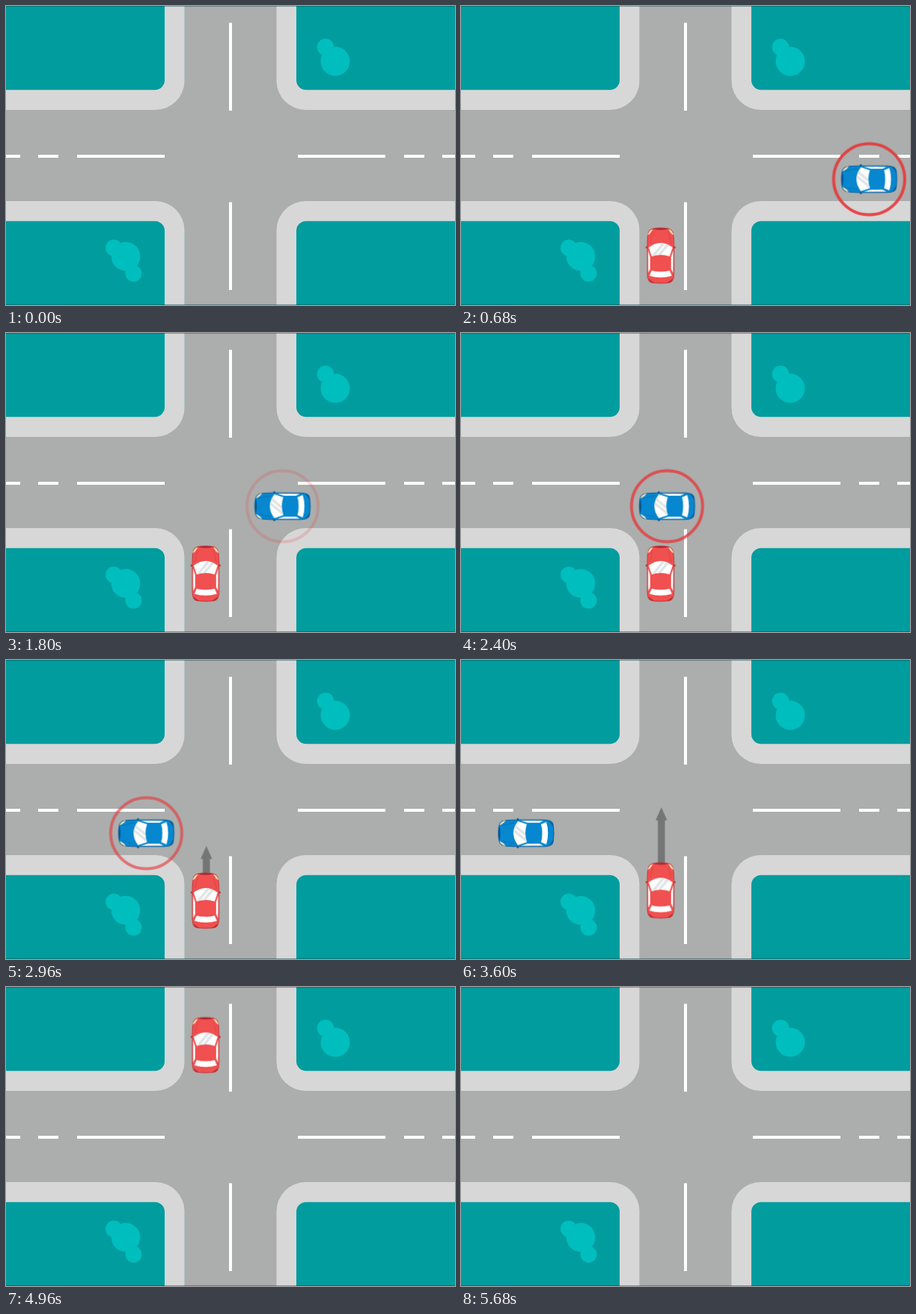
An HTML page without scripts for the animation above (5760 ms loop, 600 px wide and 400 px high).

```html
<!DOCTYPE html>
<html lang="en">
<head>
<meta charset="utf-8">
<title>Crossroads: give way</title>
<style>
  html, body { margin: 0; width: 100%; height: 100%; overflow: hidden; background: #acaead; }
  svg { display: block; width: 600px; height: 400px; }

  .blue, .red, .tip, .arrow, .ring { animation: 5760ms linear infinite; }
  .blue { animation-name: cross; --body: #0687cf; --edge: #075a9c; --tail: #0a4f8c; }
  .red { animation-name: wait; --body: #f0504f; --edge: #c2343c; --tail: #a32630; }
  .ring { animation-name: pulse; }
  .tip { animation-name: grow; }
  .arrow { animation-name: show; animation-timing-function: step-end; }

  @keyframes cross {
    from { transform: translate(652.3px, 231.7px); }
    to { transform: translate(-252px, 231.7px); }
  }
  /* roll in, stop at the line, then drive on */
  @keyframes wait {
    0% { transform: translate(266.7px, 445px); animation-timing-function: cubic-bezier(.39, .575, .565, 1); }
    17.361%, 61.111% { transform: translate(266.7px, 322px); }
    100% { transform: translate(266.7px, -57.7px); }
  }
  @keyframes pulse {
    0% { opacity: .4; }
    10.417%, 45.139%, 79.861% { opacity: 1; }
    27.778%, 62.5% { opacity: 0; }
    100% { opacity: 0; }
  }
  @keyframes grow {
    0%, 43.403% { transform: translate(267.7px, 293px); }
    60.764%, 100% { transform: translate(267.7px, 197px); }
  }
  @keyframes show {
    0% { opacity: 0; }
    43.403% { opacity: 1; }
    75%, 100% { opacity: 0; }
  }
</style>
</head>
<body>
<svg viewBox="0 0 600 400">
  <defs>
    <g id="corner">
      <rect x="-60" y="-60" width="298.5" height="199" rx="39" fill="#d7d7d7"/>
      <rect x="-60" y="-60" width="272" height="172.3" rx="13" fill="#009c9e"/>
    </g>

    <g id="lane">
      <path d="M-1 201H19M43 201H70M95 201H212"/>
    </g>

    <clipPath id="pane">
      <path d="M-16-11Q0-23 16-11L12 1Q0-3-12 1Z"/>
    </clipPath>

    <g id="side">
      <path d="M16-14L20.3-11.5L19.5-9.5L16-10Z" fill="var(--edge)"/>
    </g>
    <g id="trim">
      <path d="M10.5-35.5Q16-34 17-27.5Q13-29.5 10.5-35.5Z" fill="#f8dfae"/>
      <path d="M16.8-7L14 2V18L16.6 23Z" fill="#fff"/>
      <path d="M9 36.3Q15 35.5 16.3 30.5L13 33.5Z" fill="var(--tail)"/>
      <path d="M10-32Q13-25 14-16" fill="none" stroke="var(--edge)" stroke-width=".7" opacity=".6"/>
    </g>

    <!-- seen from above, nose up -->
    <g id="car">
      <use href="#side"/>
      <use href="#side" transform="scale(-1 1)"/>
      <path d="M0-37C9-37 14-36 16-32Q17.8-27 17.8-16V24Q17.6 33 14 35.5Q9 37 0 37Q-9 37-14 35.5Q-17.6 33-17.8 24V-16Q-17.8-27-16-32C-14-36-9-37 0-37Z"
            fill="var(--body)" stroke="var(--edge)" stroke-width="1"/>
      <path d="M-10-35.4Q0-38 10-35.4Q0-33.6-10-35.4Z" fill="var(--tail)"/>
      <use href="#trim"/>
      <use href="#trim" transform="scale(-1 1)"/>
      <g clip-path="url(#pane)">
        <rect x="-18" y="-24" width="36" height="28" fill="#fff"/>
        <path d="M-12 3L6-19M-5 3L13-19" stroke="#e1e4e6" stroke-width="3.5"/>
      </g>
      <path d="M-12 20Q0 23 12 20L15 27Q0 31.5-15 27Z" fill="#fff"/>
    </g>

    <clipPath id="ahead">
      <rect class="red" x="-60" y="-500" width="120" height="500"/>
    </clipPath>
  </defs>

  <rect width="600" height="400" fill="#acaead"/>
  <use href="#corner"/>
  <use href="#corner" transform="translate(600 0) scale(-1 1)"/>
  <use href="#corner" transform="translate(0 400) scale(1 -1)"/>
  <use href="#corner" transform="translate(600 400) scale(-1)"/>
  <path d="M238.5 0V100M238.5 300V400" stroke="#8fc9ca" stroke-width=".6" opacity=".7"/>

  <g fill="#00bebe">
    <circle cx="440" cy="74" r="19.5"/>
    <circle cx="427" cy="55" r="11.3"/>
    <circle cx="160" cy="335" r="19.3"/>
    <circle cx="144" cy="323.5" r="11"/>
    <circle cx="170.5" cy="357.7" r="11"/>
  </g>

  <g stroke="#fff" stroke-width="4">
    <use href="#lane"/>
    <use href="#lane" transform="translate(602 0) scale(-1 1)"/>
    <path d="M300 22.5V140M300 262.5V380"/>
  </g>

  <path d="M0 .5H600M0 399.5H600" stroke="#003c40" opacity=".4"/>

  <g class="arrow" clip-path="url(#ahead)">
    <path class="tip" d="M0 0L7.7 17.5H4.7V150H-4.7V17.5H-7.7Z" fill="#757575"/>
  </g>

  <g class="red"><use href="#car"/></g>

  <g class="blue">
    <use href="#car" transform="rotate(-90)"/>
    <circle class="ring" r="47.5" fill="none" stroke="#e53a3c" stroke-width="4"/>
  </g>
</svg>
</body>
</html>
```
